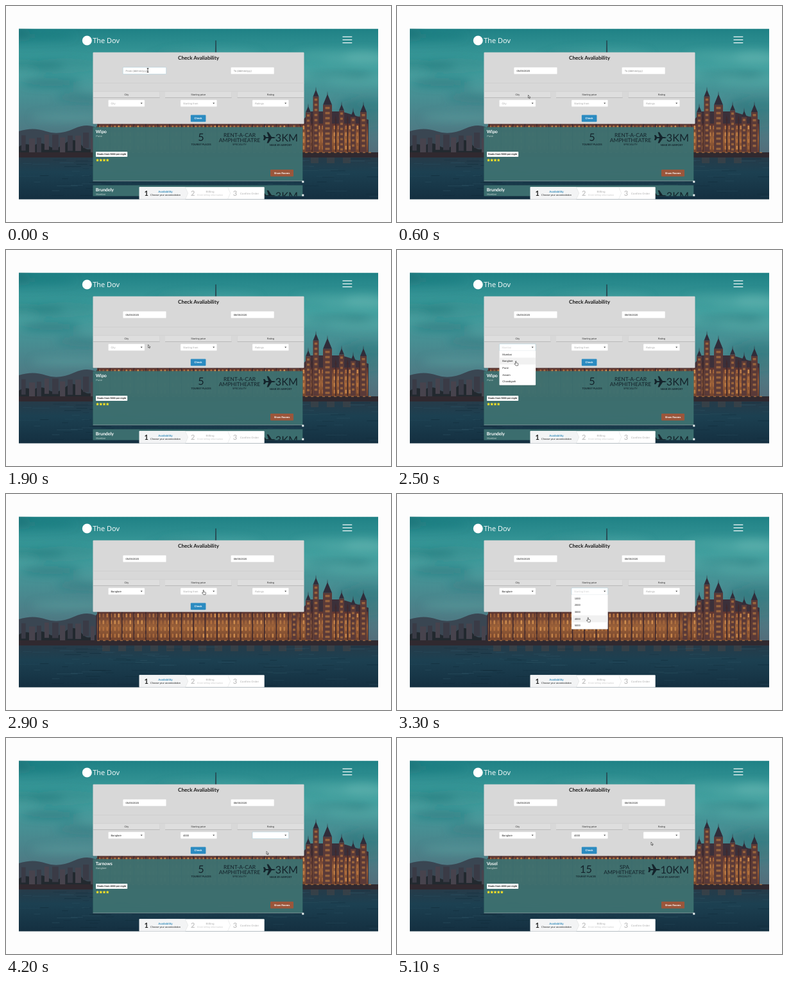
These frames come from a looping animation (600 px wide and 338 px high, 5200 ms). An HTML page:

```html
<!DOCTYPE html>
<html lang="en">
<head>
<meta charset="utf-8">
<title>Room booking</title>
<style>
html, body { margin: 0; width: 100%; height: 100%; overflow: hidden; background: #fdfdfd; }
svg { display: block; width: 100%; height: 100%; }
text { font-family: "Liberation Sans", Arial, sans-serif; font-size: 4.1px; fill: #222; text-rendering: geometricPrecision; }
.lato { font-family: Lato, sans-serif; fill: #14232b; }
.b { font-weight: bold; }
.mid { text-anchor: middle; }
.logo { font-family: "Open Sans", "Noto Sans", sans-serif; font-size: 11px; fill: #fff; }
</style>
</head>
<body>
<svg id="stage" viewBox="0 0 600 338">
<defs>
  <linearGradient id="sky" x1="0" y1="0" x2="0" y2="1">
    <stop offset="0" stop-color="#1f8185"/><stop offset=".3" stop-color="#42a09f"/>
    <stop offset=".65" stop-color="#4a858c"/><stop offset="1" stop-color="#546a78"/>
  </linearGradient>
  <linearGradient id="water" x1="0" y1="0" x2="0" y2="1">
    <stop offset="0" stop-color="#263b49"/><stop offset=".35" stop-color="#1c4051"/>
    <stop offset="1" stop-color="#142f40"/>
  </linearGradient>
  <linearGradient id="lit" x1="0" y1="0" x2="0" y2="1">
    <stop offset="0" stop-color="#5b3431"/><stop offset=".5" stop-color="#9a6038"/>
    <stop offset="1" stop-color="#70412c"/>
  </linearGradient>
  <filter id="soft" x="-50%" y="-100%" width="200%" height="300%"><feGaussianBlur stdDeviation="7"/></filter>
  <filter id="shade" x="-10%" y="-30%" width="120%" height="170%">
    <feDropShadow dx="0" dy=".5" stdDeviation=".6" flood-opacity=".3"/>
  </filter>
  <clipPath id="photo"><rect x="20" y="35.5" width="560" height="267"/></clipPath>
  <clipPath id="fold"><rect x="130" y="276" width="340" height="21.5"/></clipPath>
</defs>
</svg>
<script>
const LOOP = 5200, STEP = 100;
const stage = document.getElementById("stage");

let seed = 11;
const rnd = (a, b) => a + (b - a) * ((seed = (seed * 16807) % 2147483647) / 2147483647);
const times = (n, fn) => Array.from({ length: n }, (_, i) => fn(i)).join("");
const rect = (x, y, w, h, fill, more = "") => `<rect x="${x}" y="${y}" width="${w}" height="${h}" fill="${fill}" ${more}/>`;
const path = (d, fill, more = "") => `<path d="${d}" fill="${fill}" ${more}/>`;
const text = (x, y, s, cls = "", style = "") => `<text x="${x}" y="${y}" class="${cls}" style="${style}">${s}</text>`;
const group = (id, body, more = "") => `<g id="${id}" ${more}>${body}</g>`;
const size = (px, fill) => `font-size:${px}px;${fill ? "fill:" + fill : ""}`;

function star(cx, cy, r) {
  const pts = Array.from({ length: 10 }, (_, i) => {
    const a = i * Math.PI / 5 - Math.PI / 2, q = i % 2 ? r * 0.48 : r;
    return (cx + q * Math.cos(a)).toFixed(2) + "," + (cy + q * Math.sin(a)).toFixed(2);
  });
  return `<polygon points="${pts.join(" ")}" fill="#ffe623"/>`;
}
const stars = (x, y, n) => times(n, i => star(x + i * 5.2, y, 2.6));

function tower(x, top, w, base) {
  const h = w * 2.4;
  return path(`M${x} ${top - 5}l.5 6L${x + w} ${top + h}H${x - w}L${x - 0.5} ${top + 1}z`, "#302d3a")
    + rect(x - w, top + h, 2 * w, base - top - h, "#5a3a38")
    + times(Math.floor((base - top - h) / 8), i => rect(x - w * 0.5, top + h + 3 + i * 8, w, 3.5, "#ad713e", 'opacity=".75"'));
}

function backdrop() {
  const clouds = times(26, () =>
    `<ellipse cx="${rnd(10, 590)}" cy="${rnd(40, 180)}" rx="${rnd(25, 80)}" ry="${rnd(4, 13)}" fill="${rnd(0, 1) < 0.55 ? "#1b686f" : "#68b8b3"}" opacity="${rnd(0.2, 0.5)}"/>`);
  const hills = path("M20 196q22-7 42 0t44-4 40 2v46H20z", "#3a4652")
    + path("M20 220q12-7 22-1 12-8 24 0t26-4 26 3 28-4v26H20z", "#22292f");
  const far = times(10, i => rect(24 + i * 12, rnd(198, 209), rnd(6, 10), 24, i % 2 ? "#47434d" : "#3a3b46"));
  const roof = path("M140 190l10-13h128l8-30 41-35 41 35 8 30h88l11-12h48l42 13v52H140z", "#3b303a");
  const body = rect(142, 184, 422, 46, "url(#lit)");
  const windows = times(4, row => times(70, i =>
    rect(144.5 + i * 6, 187 + row * 10.5, 2.6, 6.2, rnd(0, 1) < 0.5 ? "#d69250" : "#b87440", `rx="1.2" opacity="${rnd(0.5, 1)}"`)));
  const piers = times(23, i => rect(143 + i * 18.5, 178, 1.7, 52, "#40292d")
    + path(`M${143.8 + i * 18.5} 171l1.6 8h-3.2z`, "#40292d"));
  const towers = tower(449, 150, 4, 228) + tower(471, 157, 4, 228) + tower(501, 138, 7, 228)
    + tower(483, 131, 4.5, 228) + tower(523, 154, 4, 228) + tower(541, 164, 4, 228) + tower(557, 154, 5, 229);
  const quay = rect(20, 229, 560, 8, "#30292f")
    + times(48, i => rect(142 + i * 9, 228.5, 4, 1.6, "#d08b4b", 'opacity=".6"'));
  const waves = times(110, () =>
    rect(rnd(20, 570), rnd(238, 302), rnd(8, 34), rnd(0.4, 1), rnd(0, 1) < 0.5 ? "#2e5465" : "#102938", 'opacity=".55"'));
  const glow = times(16, i => rect(150 + i * 25, 237, 12, 9, "#79503b", 'opacity=".22"'));
  return rect(20, 35.5, 560, 202, "url(#sky)") + `<g filter="url(#soft)">${clouds}</g>`
    + hills + far + path("M326.3 75l.4-21h.6l.4 21z", "#263a45", 'stroke="#263a45" stroke-width=".5"')
    + roof + body + windows + piers + towers + quay + rect(20, 237, 560, 66, "url(#water)") + glow + waves;
}

function header() {
  return `<circle cx="126.3" cy="54" r="7.5" fill="#fff"/>` + text(135.2, 58.2, "The Dov", "logo")
    + times(3, i => rect(524.5, 47.6 + i * 4.7, 14.8, 1.2, "#fff"));
}

const PLANE = "M0 4.5h2.2l2 3h4L5.5 0H8l5 7.5h3q3 .4 3 1t-3 1h-3L8 17H5.5l2.7-7.5h-4l-2 3H0l1-4z";

function card(o, y = 189.5) {
  const d = o.km > 9 ? 9.6 : 0;
  const cap = size(4.1), big = size(16.2), word = size(8.5);
  return `<g transform="translate(0 ${y})">`
    + rect(135.5, 0, 326.8, 84, "#3d706f", 'opacity=".97" filter="url(#shade)"')
    + rect(135.5, 84, 326.8, 0.7, "#a4bab8") + rect(461.3, 84, 3, 3, "#eef3f3")
    + text(139.8, 9.3, o.name, "lato b", size(7, "#fff"))
    + text(140.2, 15.6, o.city, "", size(4.1, "#bed0ce"))
    + rect(140, 38.5, 49.2, 8, "#fff", 'rx=".8"')
    + text(164.6, 43.9, `Starts from ${o.price} per night`, "b mid", size(3.65, "#111"))
    + stars(142.6, 51.8, o.stars)
    + text(304 - d, 21.8, o.places, "lato mid", big)
    + text(304 - d, 28.6, "TOURIST PLACES", "lato mid b", size(3.9))
    + text(364 - d, 15.4, o.extra, "lato mid", word)
    + text(364 - d, 23.4, "AMPHITHEATRE", "lato mid", word)
    + text(364 - d, 28.8, "SPECIALITY", "lato mid", cap)
    + path(PLANE, "#14232b", `transform="translate(${401 - d} 8)"`)
    + text(455, 22.3, o.km + "KM", "lato", big + ";text-anchor:end")
    + text(428 - d / 2, 29.8, "NEAR BY AIRPORT", "lato mid b", size(4))
    + rect(412, 66.4, 36, 10.8, "#9b563b", 'rx="1"')
    + text(430, 73.2, "Show Rooms", "b mid", size(3.9, "#fff")) + `</g>`;
}

const selects = [
  { id: "city", x: 159.5, label: "City", hint: "City", items: ["Mumbai", "Banglore", "Pune", "Assam", "Chandigarh"] },
  { id: "price", x: 272, label: "Starting price", hint: "Starting from", items: ["1000", "2000", "3000", "4000", "5000"] },
  { id: "rate", x: 384, label: "Rating", hint: "Ratings", items: [1, 2, 3, 4, 5] }
];

const input = (id, x) => rect(x, 96, 67.3, 10.6, "#fff", `id="${id}Box" rx="1" stroke="#e4e4e4" stroke-width=".4"`)
  + `<text id="${id}" x="${x + 4.3}" y="102.7"></text>`;

function panel() {
  return rect(135.5, 72.5, 329, 112, "#d8d8d8", 'rx="1" filter="url(#shade)"')
    + text(300, 83.6, "Check Avaliability", "lato b mid", size(8.1, "#1b1b1b"))
    + input("from", 182.3) + input("to", 350.5)
    + rect(135.5, 120.4, 329, 0.5, "#c4c4c4") + rect(135.5, 133, 329, 0.4, "#c8c8c8")
    + selects.map((s, i) => {
      const lx = [136, 248, 360.5][i];
      return rect(lx, 134.2, 103.6, 8.7, "#dedede", 'filter="url(#shade)"')
        + text(lx + 51.8, 140, s.label, "mid", size(3.9, "#333"))
        + rect(s.x, 147, 56.6, 10.5, "#fff", `id="${s.id}Box" rx="1" stroke="#e2e2e2" stroke-width=".4"`)
        + `<text id="${s.id}" x="${s.x + 3.9}" y="153.7"></text>`
        + path(`M${s.x + 50.2} 151.5h3l-1.5 1.8z`, "#333");
    }).join("")
    + rect(287.8, 170.6, 23.6, 10.6, "#2b8bc1", 'rx="1"')
    + text(299.6, 177.4, "Check", "b mid", size(4, "#fff"));
}

const menu = s => group(s.id + "Menu",
  rect(s.x, 157.3, 56.6, 54.3, "#fff", 'rx=".8" filter="url(#shade)"')
  + s.items.map((v, i) => rect(s.x + 0.3, 157.8 + i * 10.7, 56, 10.7, "#f1f1f1", `id="${s.id + i}"`)
    + (s.id === "rate" ? stars(s.x + 7, 163.2 + i * 10.7, v)
      : text(s.x + 4.7, 164.5 + i * 10.7, v))).join(""));

function calendar(id, x) {
  const col = i => x + 5.3 + i * 8.33;
  const days = times(42, i => {
    const n = i < 5 ? 26 + i : i < 36 ? i - 4 : i - 35;
    const today = n === 4 && i < 20;
    const fill = today ? "#fff" : i < 8 ? "#bbb" : "#222";
    const cx = col(i % 7), y = 133.5 + Math.floor(i / 7) * 8;
    return (today ? rect(cx - 3.6, y - 4.9, 7.2, 7.2, "#2b8bc1", 'rx=".7"') : "")
      + text(cx, y, n, "mid", size(3.3, fill));
  });
  return group(id, rect(x, 109.8, 60.6, 68.2, "#fff", 'rx="1" filter="url(#shade)"')
    + path(`M${x + 8} 110l3-2.8 3 2.8z`, "#fff")
    + text(x + 30.3, 116.4, "May 2020", "b mid", size(4))
    + path(`M${x + 54.6} 113.6l1.4 1.5-1.4 1.5`, "none", 'stroke="#aaa" stroke-width=".5"')
    + rect(x, 118.6, 60.6, 0.4, "#e6e6e6")
    + ["Su", "Mo", "Tu", "We", "Th", "Fr", "Sa"].map((d, i) => text(col(i), 123.7, d, "b mid", size(3.1))).join("")
    + rect(x, 126, 60.6, 0.4, "#ececec") + days);
}

function steps() {
  const arrow = x => path(`M${x - 2.2} 283.2l4.4 9.8-4.4 9.6`, "none", 'stroke="#d9dadb" stroke-width=".5"');
  const grey = "#c4c4c4";
  return rect(207.7, 283.2, 195, 19.6, "#fff", 'rx="1"')
    + path("M207.7 283.2h71.6l4.4 9.8-4.4 9.8h-71.6z", "#f3f4f5") + arrow(281.5) + arrow(347.5)
    + text(218.8, 297, "1", "lato b mid", size(11, "#222"))
    + text(248.5, 291.6, "Availability", "b mid", size(4.3, "#3a8fbd"))
    + text(248.5, 297.2, "Choose your accomodation", "mid", size(3.85))
    + text(291.2, 297, "2", "lato b mid", size(11, grey))
    + text(318, 291.6, "Billing", "b mid", size(4.3, grey))
    + text(318, 297.2, "Enter billing information", "mid", size(3.85, "#ccc"))
    + text(357, 297, "3", "lato b mid", size(11, grey))
    + text(379.4, 294.6, "Confirm Order", "b mid", size(4.3, grey));
}

const outline = 'stroke="#111" stroke-width=".55" stroke-linejoin="round"';
const pointers = {
  beam: path("M-1.3-3H1.3M0-3V3M-1.3 3H1.3", "none", 'stroke="#111" stroke-width=".8"'),
  hand: path("M-.8-2.4q.6-.7 1.1 0V.2l2.5.6q.7.2.6 1L3 4.4H-.5L-2.6 1.7q.2-.9 1.8.1z", "#fff", outline),
  arrow: path("M-1-2.6V2L.1 1.1.9 2.8l.8-.4L.9.8h1.4z", "#fff", outline)
};

const first = { name: "Wipo", city: "Pune", price: 5000, stars: 4, places: 5, extra: "RENT-A-CAR", km: 3 };
const second = { ...first, name: "Brundely", city: "Mumbai" };
const four = { ...first, name: "Tarnows", city: "Banglore", price: 4000 };
const five = { ...four, name: "Vosel", stars: 5, places: 15, extra: "SPA", km: 10 };

stage.innerHTML += `<g clip-path="url(#photo)">` + backdrop() + header()
  + group("all", card(first) + `<g clip-path="url(#fold)">${card(second, 280.5)}</g>` + rect(461.3, 294.6, 3, 3, "#eef3f3"))
  + group("four", card(four)) + group("five", card(five))
  + panel() + steps() + `</g>`
  + calendar("cal1", 182.6) + calendar("cal2", 351) + selects.map(menu).join("")
  + group("pointer", Object.entries(pointers).map(([k, p]) => group(k, p)).join(""));

const $ = id => document.getElementById(id);

// time, x, y, pointer shape
const moves = [
  [0, 221, 100.5, "beam"], [200, 221, 100.5, "beam"], [500, 205.5, 142, "hand"], [600, 205.5, 142, "arrow"],
  [900, 386, 101, "beam"], [1000, 386, 101, "arrow"], [1300, 390.5, 143, "hand"], [1500, 398.5, 142, "hand"],
  [1600, 398.5, 142, "arrow"], [2000, 190, 152.5, "hand"], [2200, 188, 154, "hand"], [2500, 185.5, 176.5, "hand"],
  [2600, 185.5, 176, "arrow"], [2900, 308, 153, "hand"], [3000, 308, 153, "hand"], [3300, 298, 196, "hand"],
  [3400, 298, 196, "arrow"], [3700, 404.5, 152.5, "hand"], [3800, 404.5, 152.5, "hand"], [4000, 406, 196, "hand"],
  [4100, 406.5, 195, "arrow"], [4200, 407, 180, "arrow"], [4500, 403, 153, "hand"], [4800, 402, 206, "hand"],
  [4900, 402, 206, "arrow"], [5100, 397, 165.5, "arrow"], [5200, 397, 165.5, "arrow"]
];
const popups = {
  cal1: [[200, 600]], cal2: [[1000, 1600]],
  cityMenu: [[2100, 2600]], priceMenu: [[3000, 3400]], rateMenu: [[3800, 4100], [4500, 4900]]
};
const results = { all: [0, 2600], four: [4100, 4900], five: [4900, LOOP] };

function put(id, value, hint, focus) {
  $(id).textContent = value || hint;
  $(id).style.fill = value ? "#222" : focus ? "#d0d0d0" : "#a9a9a9";
  $(id + "Box").setAttribute("stroke", focus ? "#96c8da" : "#e3e3e3");
}

function draw(t) {
  let i = 0;
  while (i < moves.length - 2 && moves[i + 1][0] <= t) i++;
  const [t0, x0, y0, shape] = moves[i], [t1, x1, y1] = moves[i + 1];
  const k = (t - t0) / (t1 - t0), e = k * k * (3 - 2 * k);
  const y = y0 + (y1 - y0) * e;
  $("pointer").setAttribute("transform", `translate(${x0 + (x1 - x0) * e} ${y})`);
  for (const p in pointers) $(p).style.display = p === shape ? "" : "none";

  const within = ([a, b]) => t >= a && t < b;
  const open = {};
  for (const id in popups) {
    const span = popups[id].find(within);
    open[id] = !!span;
    $(id).style.display = span ? "" : "none";
    if (span) $(id).style.opacity = Math.min(1, (t - span[0] + STEP) / 200);
  }
  for (const id in results) $(id).style.display = within(results[id]) ? "" : "none";

  const row = Math.floor((y - 157.8) / 10.7);
  for (const s of selects) s.items.forEach((_, n) => { $(s.id + n).style.opacity = n === row ? 1 : 0; });

  put("from", t >= 600 && "05/05/2020", "From (dd/mm/yyy)", t < 600);
  $("from").style.fill = t >= 600 ? "#222" : "#888";
  put("to", t >= 1600 && "08/05/2020", "To (dd/mm/yyy)", t >= 1000 && t < 1600);
  $("to").style.fill = t >= 1600 ? "#222" : "#888";
  put("city", t >= 2600 && "Banglore", open.cityMenu ? "Mumbai" : "City", t >= 2100 && t < 2600);
  put("price", t >= 3400 && "4000", "Starting from", open.priceMenu);
  put("rate", "", t >= 4100 ? "" : "Ratings", t >= 3700 && t < 4500);
}

let last = -1;
function tick() {
  const t = Math.floor((performance.now() % LOOP) / STEP) * STEP;
  if (t !== last) draw(last = t);
  requestAnimationFrame(tick);
}
tick();
</script>
</body>
</html>
```
